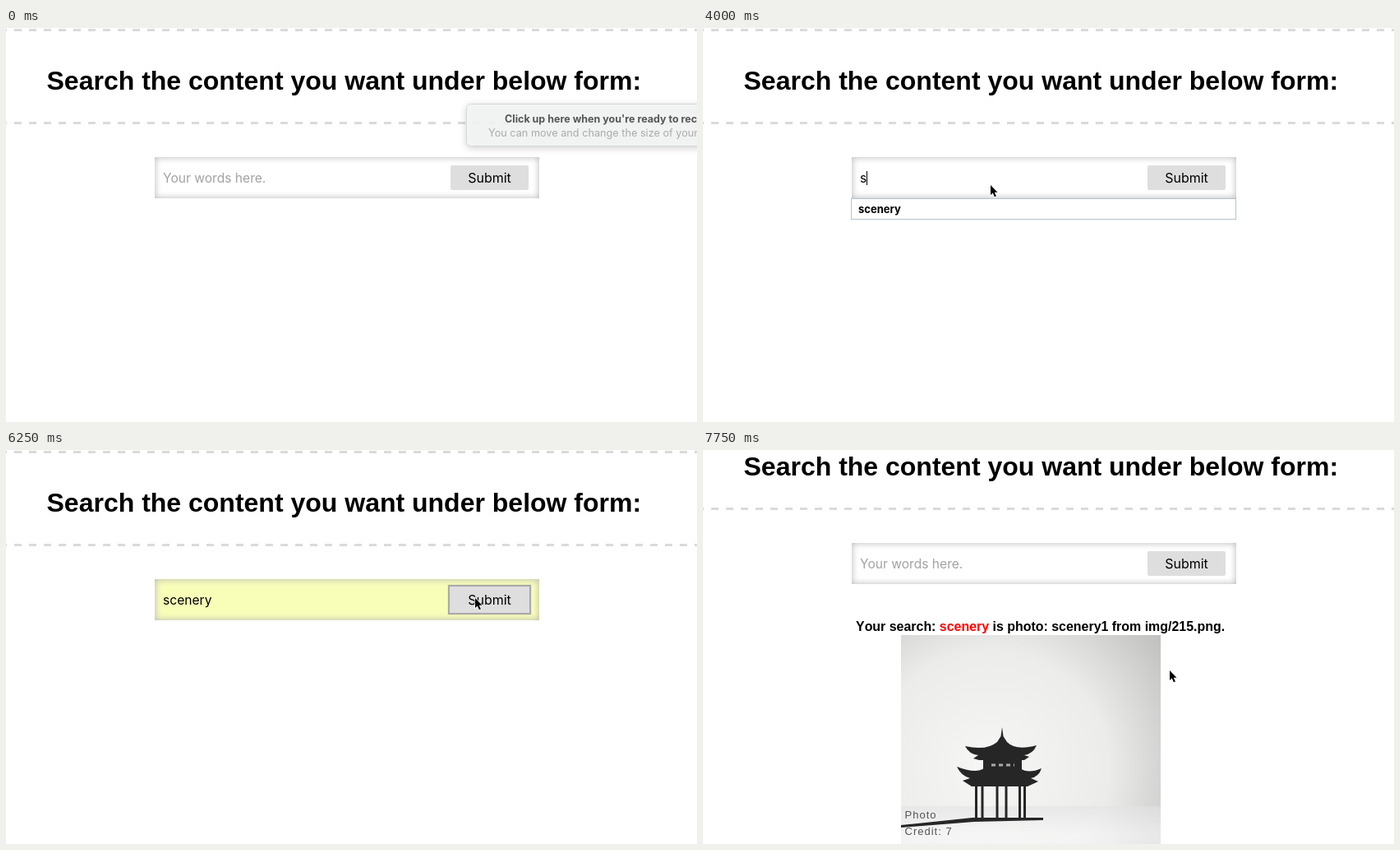
Recreate the animation shown at these times as an HTML page. Size 841 by 479 pixels, loop 8000 ms.

```html
<!DOCTYPE html>
<html lang="en">
<head>
<meta charset="utf-8">
<title>Search form</title>
<style>
html, body { margin: 0; width: 100%; height: 100%; overflow: hidden; background: #fff; }
#stage { position: relative; width: 841px; height: 479px; overflow: hidden; }
#page, svg { position: absolute; left: 0; top: 0; }
svg { width: 841px; height: 600px; }
#field, #button, #panel { position: absolute; box-sizing: border-box; }
#field { left: 181px; top: 157px; width: 468px; height: 50px; box-shadow: inset 0 0 8px #b4b4b4; }
#button { left: 541px; top: 167px; width: 95px; height: 30px; border-radius: 2px; background: #dedede; }
#button.focus { border-radius: 0; box-shadow: 0 0 0 1px #dedede, 0 0 1px 3px #a9a9a9; }
#panel { left: 181px; top: 207px; width: 468px; height: 400px; background: #fafafa; }
text { white-space: pre; }
.bold { font: bold 15.95px "Liberation Sans", Arial, sans-serif; font-kerning: none; }
.ui { font: 15.6px Inter, sans-serif; }
.credit { font: 13px "Liberation Sans", Arial, sans-serif; letter-spacing: 1px; fill: #555; }
</style>
</head>
<body>
<div id="stage">
  <div id="page">
    <div id="panel"></div>
    <div id="field"></div>
    <div id="button"></div>
    <svg>
      <defs>
        <radialGradient id="sky" gradientUnits="userSpaceOnUse" cx="350" cy="430" r="260">
          <stop offset="0" stop-color="#f6f6f5"/>
          <stop offset=".55" stop-color="#ececeb"/>
          <stop offset="1" stop-color="#c0c0bf"/>
        </radialGradient>
        <linearGradient id="water" x2="0" y2="1">
          <stop offset="0" stop-color="#e2e2e2"/>
          <stop offset=".3" stop-color="#f8f8f8"/>
        </linearGradient>
      </defs>
      <path d="M-8 2.5H841M-8 115.5H841" stroke="#dadada" stroke-width="3" stroke-dasharray="9"/>
      <text class="bold" style="font-size:32px" x="49.5" y="75">Search the content you want under below form:</text>
      <text class="ui" id="words" x="191" y="188"></text>
      <path id="caret" d="M0 174V191" stroke="#000"/>
      <text class="ui" style="font-size:16px" x="588.5" y="188" text-anchor="middle">Submit</text>
      <g id="list">
        <rect x="180.5" y="207.5" width="468" height="25" fill="#fff" stroke="#b4c3cd"/>
        <rect id="hover" x="181" y="208" width="467" height="24" fill="#e0e0e0"/>
        <text class="ui" style="font-size:13px;font-weight:700" x="189" y="225">scenery</text>
      </g>
      <g id="result">
        <text class="bold" x="186" y="264">Your search: <tspan fill="#f00">scenery</tspan> is photo: scenery1 from img/215.png.</text>
        <rect x="241" y="269" width="316" height="320" fill="url(#sky)"/>
        <rect x="241" y="477" width="316" height="112" fill="url(#water)" opacity=".6"/>
        <g fill="#262626">
          <path d="M364 381L365.5 392 370 399Q381 410 406 403 402 413 391 415L397 417 391 421H336L329 419 335 415Q324 414 319 404 345 410 358 399L362.5 392Z"/>
          <path d="M341 420H388V434H341Z"/>
          <path d="M342 431Q332 438 309 429 314 440 325 443L316 446 327 453H395L408 447 399 443Q409 441 412 431 396 438 386 431Z"/>
          <path d="M332.5 452V491M340 452V491M358 452V491M369 452V491M385.5 452V491M391.5 452V491" stroke="#262626" stroke-width="3"/>
          <path d="M241 500L328 491H414V494L330 496 241 503Z"/>
        </g>
        <path d="M351 427H379" stroke="#aaa" stroke-width="3" stroke-dasharray="5 4"/>
        <text class="credit" x="245.5" y="492">Photo</text>
        <text class="credit" x="245.5" y="512">Credit: 7</text>
        <text class="credit" x="245.5" y="532">Photo Find</text>
      </g>
    </svg>
  </div>
  <svg>
    <g id="tip">
      <rect x="560.5" y="92.5" width="320" height="51" rx="5" fill="#f5f7f6" fill-opacity=".88" stroke="#d3d8d6" style="filter:drop-shadow(0 2px 4px #0003)"/>
      <text class="ui" style="font-size:12.5px;font-weight:700" x="607" y="115" fill="#555">Click up here when you're ready to record</text>
      <text class="ui" style="font-size:12.7px" x="587" y="132" fill="#aaa">You can move and change the size of your recording</text>
    </g>
    <path id="cursor" d="M.5 1V13L3.2 10.5 5.4 15.3 7.4 14.4 5.3 9.7H9Z" stroke="#fff" stroke-width="1.4" paint-order="stroke"/>
  </svg>
</div>
<script>
const LOOP = 8000, STEP = 250;
const $ = id => document.getElementById(id);
const show = (id, on) => $(id).style.visibility = on ? 'visible' : 'hidden';
const within = (t, ...spans) => spans.some(([a, b]) => t >= a && t < b);

// time, x, y of the pointer
const path = [
  [500, 540, 90], [750, 508.5, 118], [1250, 470, 178], [2000, 349.5, 185],
  [2250, 349.5, 185], [2500, 349.5, 190], [4500, 349.5, 190], [4750, 349.5, 191],
  [5000, 349.5, 191], [5500, 300, 223], [5750, 300, 223], [6250, 570.5, 179],
  [6750, 570.5, 179], [7250, 567.5, 267], [LOOP, 567.5, 267]
];

function pointer(t) {
  const i = Math.max(1, path.findIndex(k => k[0] > t));
  const [t0, x0, y0] = path[i - 1], [t1, x1, y1] = path[i];
  const p = Math.max(0, (t - t0) / (t1 - t0));
  return [x0 + (x1 - x0) * p, y0 + (y1 - y0) * p];
}

function typed(t) {
  if (t < 4000 || t >= 6750) return '';
  return 'scenery'.slice(0, t < 4250 ? 1 : t < 5500 ? 2 : 7);
}

function draw(t) {
  const value = typed(t), words = $('words');
  words.textContent = value || 'Your words here.';
  words.setAttribute('fill', value ? '#000' : '#a2a2a2');

  const end = value ? words.getComputedTextLength() : 0;
  $('caret').setAttribute('transform', `translate(${Math.round(191 + end) + .5})`);
  show('caret', within(t, [2000, 2500], [3000, 3500], [4000, 4750], [5750, 6000]));

  show('list', within(t, [4000, 5750]));
  show('hover', within(t, [5500, 5750]));
  $('field').style.backgroundColor = within(t, [5500, 6750]) ? '#f8fdb8' : 'transparent';
  $('button').className = within(t, [6250, 6750]) ? 'focus' : '';

  show('result', t >= 6750);
  show('panel', within(t, [6750, 7000]));
  const scroll = Math.max(0, (t - 7250) / 500);
  $('page').style.transform = `translateY(${-44 * scroll ** 2}px)`;

  $('tip').style.opacity = Math.max(0, 1 - t / 500);
  show('cursor', t >= 500);
  $('cursor').setAttribute('transform', `translate(${pointer(t)})`);
}

const start = performance.now();
function tick() {
  const t = (performance.now() - start) % LOOP;
  draw(Math.floor(t / STEP) * STEP);
  requestAnimationFrame(tick);
}
tick();
</script>
</body>
</html>
```
